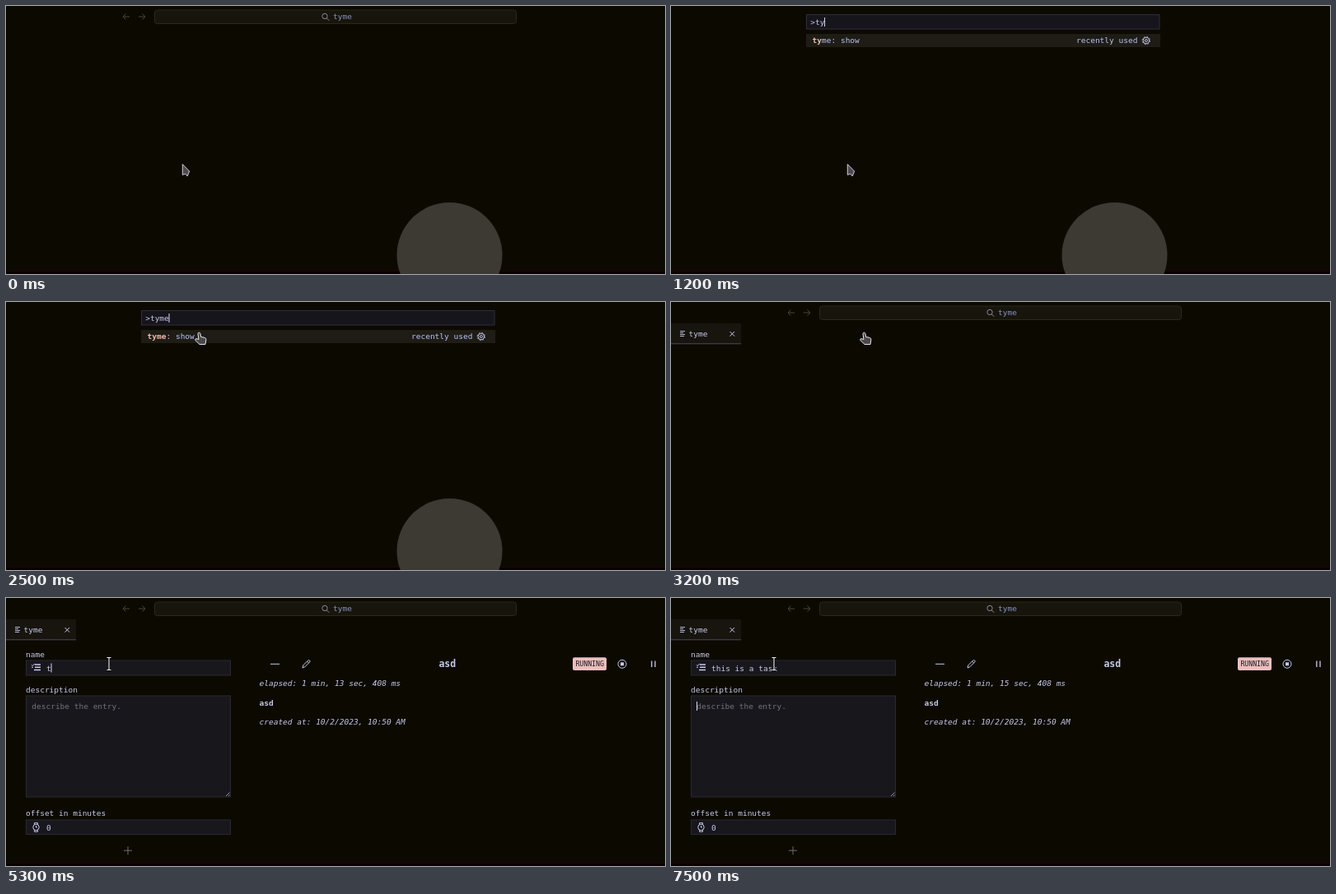
An HTML page that plays this animation: 800 by 326 pixels, repeating every 8000 ms.

```html
<!DOCTYPE html>
<html lang="en">
<head>
<meta charset="utf-8">
<title>Time tracker demo</title>
<style>
html, body { margin: 0; width: 100%; height: 100%; overflow: hidden; background: #0c0a00; }
svg { display: block; width: 800px; height: 326px; }
text { font: 9.5px "DejaVu Sans Mono", monospace; fill: #c6c9e9; white-space: pre; }
.dim { fill: #8b8883; }
.hint { fill: #747279; }
.key { font-size: 8.4px; fill: #b9bce0; text-anchor: middle; }
.focus { fill: #bac4f6; }
.hit { font-weight: bold; fill: #f1bbae; }
.field { fill: #18171c; stroke: #2a2931; }
.line { fill: none; stroke: #c6c9e9; }
.faint { fill: none; stroke: #47453d; }
.caret { fill: #d6d8f2; }
.it { font-style: italic; }
.b { font-weight: bold; }
</style>
</head>
<body>
<svg viewBox="0 0 800 326">
  <defs>
    <g id="gear" class="line">
      <circle r="3.8"/><circle r="1.5"/>
      <circle r="4.7" stroke-width=".8" stroke-dasharray="1.8 1.891"/>
    </g>
  </defs>
  <rect y="322" width="800" height="4" fill="#0a0000"/>
  <rect y="322" width="800" height="1" fill="#1c0408"/>
  <circle id="logo" cx="538.5" cy="303" r="64" fill="#3c3a32"/>

  <g id="bar">
    <path class="faint" d="M150 13h-8m3.5-3.5l-3.5 3.5 3.5 3.5M161 13h8m-3.5-3.5l3.5 3.5-3.5 3.5"/>
    <rect x="180.5" y="5" width="439" height="16.5" rx="3" fill="#17150c" stroke="#2b291d"/>
    <path class="line" style="stroke:#9a92a6" stroke-width=".9" d="M389.3 14.8l3 3M390.2 12.4a3.2 3.2 0 1 1-6.4 0a3.2 3.2 0 1 1 6.4 0"/>
    <text x="397" y="16" style="fill:#8792bd">tyme</text>
  </g>

  <g id="palette">
    <rect id="back" x="160" width="438" height="326" fill="#0c0a00"/>
    <rect x="164.5" y="10.5" width="428.5" height="17.5" fill="#16151b" stroke="#2e2d3c"/>
    <text id="query" x="169.2" y="22.8"></text>
    <rect id="queryCaret" class="caret" y="14" width="1" height="11"/>
    <rect x="164" y="34" width="430" height="16" fill="#1e1c15"/>
    <text class="focus" x="171.6" y="45"><tspan id="hit" class="hit"></tspan><tspan id="rest"></tspan></text>
    <text class="focus" x="492" y="45">recently used</text>
    <use href="#gear" x="576.8" y="42"/>
    <g id="list"></g>
  </g>

  <g id="tab">
    <rect y="26" width="85" height="25" fill="#17150e"/>
    <rect y="50.3" width="85" height="1" fill="#4b4a5c"/>
    <path class="line" d="M11 35.5h6M11 37.5h4M11 39.5h6M11 41.5h5" stroke-width=".9"/>
    <text x="21.5" y="41.7">tyme</text>
    <path class="line" d="M71.5 36l5.6 5.6m0-5.6l-5.6 5.6"/>
  </g>

  <g id="page">
    <text x="24" y="72">name</text>
    <rect class="field" x="24.5" y="76" width="248" height="18"/>
    <path class="line" d="M35 81h7M35 84.3h7M34 87.5h8" stroke-width="1.5"/>
    <path class="line" d="M31 81.3l1.3 1.4 2.4-2.8M31 84.3h2"/>
    <text id="name" x="49" y="88.5"></text>
    <rect id="nameCaret" class="caret" y="79.5" width="1" height="11"/>

    <text x="24" y="115.2">description</text>
    <rect class="field" x="24.5" y="119" width="248" height="123"/>
    <text class="hint" x="31.3" y="134.8">describe the entry.</text>
    <rect id="noteCaret" class="caret" x="31" y="126" width="1" height="11"/>
    <path class="line" d="M267 241l4.5-4.5M270 241l1.5-1.5" stroke-width=".7"/>

    <text x="24" y="265.4">offset in minutes</text>
    <rect class="field" x="24.5" y="270" width="248" height="17.5"/>
    <path class="line" d="M34.5 275.4v-1.8h4v1.8M34.5 282.4v1.8h4v-1.8M36.5 277v2h1.5"/>
    <circle class="line" cx="36.5" cy="278.9" r="3.7"/>
    <text x="49" y="282.5">0</text>
    <path class="faint" style="stroke:#6d6b70" d="M143 307.2h10M148 302.2v10"/>

    <path class="line" d="M321 80.3h11"/>
    <path class="line" d="M360 85l.8-3.2 6-6q.9-.6 1.8.2t.2 1.8l-6 6zM365.5 77l2 2"/>
    <text class="b" x="525.4" y="84" style="font-size:11.5px">asd</text>
    <rect x="688" y="72.3" width="41" height="15.6" rx="2" fill="#ecbfbd"/>
    <text x="691.4" y="83.2" style="font-size:8.2px;fill:#1a1820">RUNNING</text>
    <circle class="line" cx="748" cy="80.3" r="5"/>
    <rect x="746" y="78.3" width="4" height="4" fill="#c6c9e9"/>
    <path class="line" d="M783.8 76.5v7.5M788 76.5v7.5" stroke-width="1.3"/>
    <text id="elapsed" class="it" x="307.5" y="107"></text>
    <text class="b" x="307.5" y="131">asd</text>
    <text class="it" x="307.5" y="154.3">created at: 10/2/2023, 10:50 AM</text>
  </g>

  <g id="pointer" stroke-linejoin="round">
    <path id="arrow" d="M.3.5V13.4L3.8 12.2 6.2 15 8.6 9z" fill="#4e4a51" stroke="#cdc9d6"/>
    <path id="hand" d="M-1.5 1.8q0-1.6 1.4-1.6 1.3 0 1.6 1.6l.6 3.6 4.6 1q1.9.5 1.7 2.5l-.9 5.6h-7l-5.2-5q-.6-1.7 1.2-1.9l2.9 1z" fill="#4a4849" stroke="#e6e4ea"/>
    <g id="beam" fill="none">
      <path d="M-2.5-7h5M-2.5 8h5M0-7V8" stroke="#0c0a0c" stroke-width="2.6"/>
      <path d="M-2.5-7h5M-2.5 8h5M0-7V8" stroke="#eeeef4" stroke-width="1.1"/>
    </g>
  </g>
</svg>
<script>
const $ = id => document.getElementById(id);
const show = (id, on) => $(id).style.display = on ? '' : 'none';
const CHAR = 5.72, HOVERED = 8;

const commands = [
  ['Developer: Reload Window'],
  ['Developer: Open Webview Developer Tools'],
  ['Preferences: Open User Settings (JSON)'],
  ['File: Save without Formatting', 'Ctrl+K S'],
  ['Preferences: Open Settings (UI)'],
  ['File Utils: New File Relative to Project Root...'],
  ['File Utils: New File Relative to Current View...'],
  ['Create: New File...', 'Ctrl+Alt+Super+N'],
  ['Preferences: Open Keyboard Shortcuts', 'Ctrl+K Ctrl+S'],
  ['Preferences: Open Default Keyboard Shortcuts (JSON)'],
  ['Snippets: Configure User Snippets'],
  ['Tasks: Open User Tasks'],
  ['Preferences: Color Theme', 'Ctrl+K Ctrl+T'],
  ['View: Toggle Zen Mode', 'Ctrl+K Z'],
  ['Developer: Toggle Keyboard Shortcuts Troubleshooting'],
  ['Extensions: Install Missing Dependencies'],
  ['Developer: Show Running Extensions']
];

// Lays out a shortcut from its right edge leftwards.
function shortcut(keys, right, y) {
  let out = '';
  for (const part of keys.split(/([+ ])/).reverse()) {
    if (part === ' ') { right -= 7; continue; }
    const plus = part === '+', w = plus ? 8.5 : 8.5 + 5.05 * part.length;
    right -= w;
    if (!plus) out += `<rect x="${right + .5}" y="${y - 6.5}" width="${w - 1}" height="13" rx="2" fill="#232133" stroke="#3b3a55"/>`;
    out += `<text class="key" x="${right + w / 2}" y="${y + 3}">${part}</text>`;
  }
  return out;
}

$('list').innerHTML = commands.map(([label, keys], i) => {
  const y = 42 + 16.08 * (i + 1), hot = i === HOVERED;
  return (hot ? `<rect x="164" y="${y - 8}" width="430" height="16" fill="#17150f"/><use href="#gear" x="576.8" y="${y}" opacity=".65"/>` : '') +
    `<text class="${hot ? '' : 'dim'}" x="171.6" y="${y + 3}">${label}</text>` +
    (keys ? shortcut(keys, hot ? 563.5 : 581, y) : '');
}).join('') + '<rect x="590" y="34" width="8" height="14" fill="#24221c"/>';

// Last value whose start time has passed.
const at = (steps, t) => steps.reduce((v, [from, val]) => t >= from ? val : v, 0);
const queryLen = [[1100, 1], [1200, 2], [1300, 3], [2200, 4]];
const nameLen = [[5300, 1], [5500, 3], [5700, 5], [5900, 6], [6100, 7], [6200, 8],
  [6700, 9], [6800, 10], [7000, 11], [7100, 12], [7300, 14]];

// The pointer moves in seven steps of 100 ms.
const progress = (t, start) => Math.min(1, Math.max(0, (Math.floor((t - start) / 100) + 1) / 7));

function drawPointer(t, fullList) {
  const p = progress(t, 1900), q = progress(t, 3300);
  const a = p * p * (3 - 2 * p), b = 1 - (1 - q) ** 2.6;
  const x = 214 + 20.5 * a - 109.5 * b, y = 192 - 155 * a + 42.5 * b;
  $('pointer').setAttribute('transform', `translate(${x} ${y})`);
  const beam = q > 0 && y > 75;
  const hand = fullList || (t >= 1900 && q === 0 && y < 50);
  show('beam', beam);
  show('hand', hand);
  show('arrow', !beam && !hand);
}

function draw(t) {
  const open = t >= 500 && t < 2900, fullList = open && t < 1200;
  show('bar', !open);
  show('palette', open);
  show('back', fullList);
  show('list', fullList);
  show('logo', t < 3100);
  show('tab', t >= 3100);
  show('page', t >= 3400);

  const n = at(queryLen, t);
  $('query').textContent = '>' + 'tyme'.slice(0, n);
  $('hit').textContent = 'tyme'.slice(0, n);
  $('rest').textContent = 'tyme: show'.slice(n);
  $('queryCaret').setAttribute('x', 168.9 + CHAR * (n + 1));
  show('queryCaret', t < 1900 || (t >= 2200 && t < 2700));

  const m = at(nameLen, t);
  $('name').textContent = m ? 'this is a task'.slice(0, m) : 'short and simple name.';
  $('name').setAttribute('class', m ? '' : 'hint');
  $('nameCaret').setAttribute('x', 48.8 + CHAR * m);
  show('nameCaret', (t >= 4100 && t < 4600) || (t >= 5300 && t < 7500));
  show('noteCaret', t >= 7500);

  const sec = 11 + Math.max(0, Math.floor((t - 3300) / 1000));
  $('elapsed').textContent = `elapsed: 1 min, ${sec} sec, ${sec > 11 ? 408 : 402} ms`;
  drawPointer(t, fullList);
}

function tick() {
  draw(performance.now() % 8000);
  requestAnimationFrame(tick);
}
tick();
</script>
</body>
</html>
```
